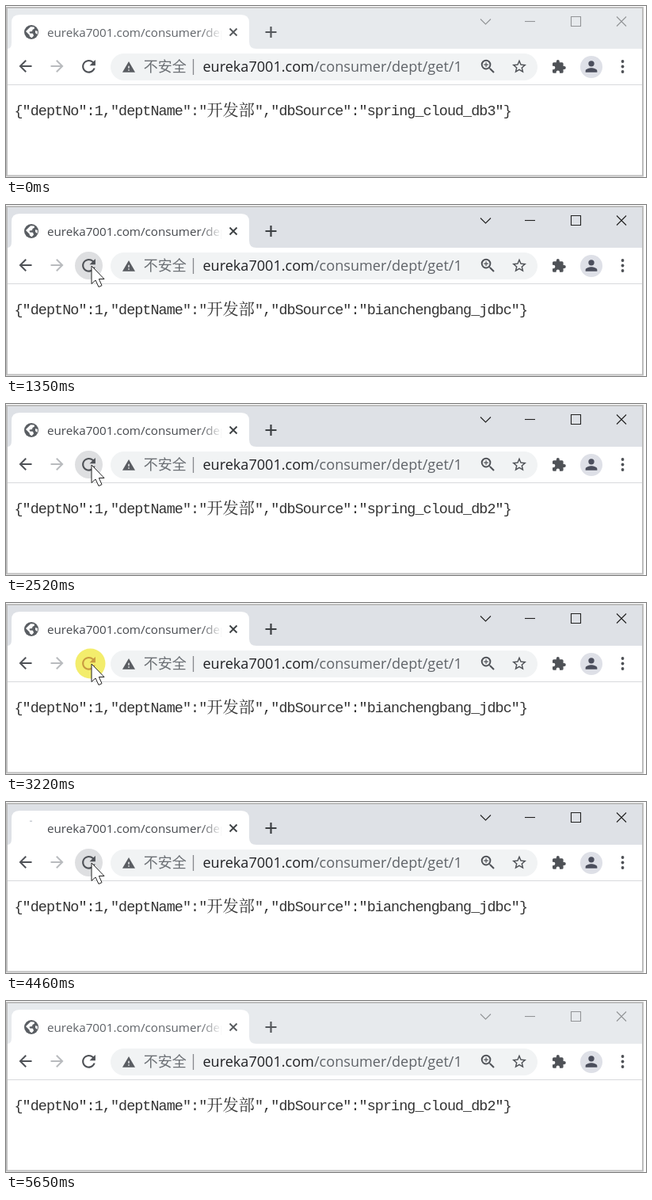
Write an HTML page that moves like this. It is 808 px wide and 216 px high and loops after 5710 ms.

```html
<!DOCTYPE html>
<html lang="zh">
<head>
<meta charset="utf-8">
<title>dept</title>
<style>
  html, body { margin: 0; width: 100%; height: 100%; overflow: hidden; background: #fff; }
  svg { display: block; width: 808px; height: 216px; }
  text { white-space: pre; }
  .ui { font-family: "Open Sans", "Noto Sans", sans-serif; }
  .cjk { font-family: "Noto Sans CJK SC", "Noto Sans CJK", sans-serif; }
  .song { font-family: "Noto Serif CJK SC", "Noto Sans CJK SC", "Noto Sans CJK", serif; }
  .mono { font: 18.4px "Liberation Mono", monospace; letter-spacing: -.92px; }
  .line { fill: none; stroke-width: 1.1; }
</style>
</head>
<body>
<svg viewBox="0 0 808 216">
  <defs>
    <linearGradient id="fade" gradientUnits="userSpaceOnUse" x1="246" y1="0" x2="273" y2="0">
      <stop offset="0" stop-color="#fff"/>
      <stop offset="1" stop-color="#000"/>
    </linearGradient>
    <mask id="clip" maskUnits="userSpaceOnUse" x="40" y="15" width="233" height="36">
      <rect x="40" y="15" width="233" height="36" fill="url(#fade)"/>
    </mask>
  </defs>

  <!-- window -->
  <rect x="1" y="2" width="803" height="212.5" fill="#fff" stroke="#bdbdbd" stroke-width="2"/>
  <rect id="bar" x="2" y="3" width="801" height="51"/>
  <path d="M2 54Q7 54 7 46V21Q7 11 17 11H297Q307 11 307 21V45Q307 54 316 54Z" fill="#fff"/>
  <path d="M2 99.5H803" stroke="#d8dadc"/>

  <!-- tab -->
  <g id="globe">
    <circle cx="32" cy="33" r="9" fill="#5a5e63"/>
    <path d="M31 26.2L35.5 26.6 36 28.5 33.5 30 33 32 29.5 32.5 30 34.5 34 34.8 35 37.5 32.5 40.2 30 38.5 29.5 36.5 25 32Z" fill="#fff"/>
    <path d="M37 31l3 1 -.5 4 -2.5-2z" fill="#fff"/>
  </g>
  <rect id="spin" x="30" y="23.5" width="3" height="1.5" fill="#c9cdd3"/>
  <text id="title" class="ui" x="52" y="39" font-size="15.2" mask="url(#clip)">eureka7001.com/consumer/dept</text>
  <path id="shut" d="M282.5 28.5l9 9m0-9l-9 9" stroke-width="1.8"/>
  <path id="plus" d="M327.5 33h14M334.5 26v14" stroke-width="2.2"/>
  <g id="controls" class="line">
    <path d="M599 16.5l6.5 6.5 6.5-6.5"/>
    <path d="M655 19.5h13"/>
    <path d="M713.5 13.5h12v12h-12z"/>
    <path d="M771 13.5l12 12m0-12l-12 12"/>
  </g>

  <!-- toolbar -->
  <rect x="132" y="60" width="539" height="34" rx="17" fill="#f1f3f4"/>
  <circle id="hover" cx="104.5" cy="76.5" r="17.5"/>
  <circle id="flash" cx="106.5" cy="76.5" r="19" fill="#f3ed6c"/>
  <g id="icons"></g>
  <circle cx="739" cy="77" r="14" fill="#dee0e7"/>
  <g id="person"></g>
  <g fill="#4f5257">
    <circle cx="778.5" cy="70" r="1.9"/>
    <circle cx="778.5" cy="76.5" r="1.9"/>
    <circle cx="778.5" cy="83" r="1.9"/>
  </g>
  <text class="cjk" x="173.8" y="83" font-size="18" fill="#6b6f74">不安全</text>
  <path d="M236.5 67v20" stroke="#85888c" stroke-width="1.3"/>
  <text class="ui" x="248.4" y="83" font-size="18.1" fill="#5f6368"><tspan fill="#202124">eureka7001.com</tspan>/consumer/dept/get/1</text>

  <!-- page -->
  <g fill="#333">
    <text class="mono" x="10.5" y="137.5">{"deptNo":1,"deptName":"</text>
    <text class="song" x="253.4" y="138.5" font-size="20.2">开发部</text>
    <text id="tail" class="mono" x="314.1" y="137.5"></text>
  </g>

  <path id="cursor" d="M0 0V22.5L5 18 9 26.5 13 24.7 9.4 16.5H16Z" fill="#fff" stroke="#222" stroke-linejoin="round"/>
</svg>

<script>
const LOOP = 5710;
const GREY = '#4f5257';
const $ = id => document.getElementById(id);
const set = (id, name, value) => $(id).setAttribute(name, value);
const show = (id, on) => set(id, 'visibility', on ? 'visible' : 'hidden');

// 24-unit icon outlines
const shapes = {
  arrow: 'M20 11H7.83l5.59-5.59L12 4l-8 8 8 8 1.41-1.41L7.83 13H20z',
  reload: 'M17.65 6.35A7.96 7.96 0 0 0 12 4c-4.42 0-8 3.58-8 8s3.58 8 8 8c3.73 0 6.84-2.55 7.73-6h-2.08A6 6 0 1 1 12 6c1.66 0 3.14.69 4.22 1.78L13 11h7V4z',
  star: 'M22 9.24l-7.19-.62L12 2 9.19 8.63 2 9.24l5.46 4.73L5.82 21 12 17.27 18.18 21l-1.63-7.03zM12 15.4l-3.76 2.27 1-4.28-3.32-2.88 4.38-.38L12 6.1l1.71 4.04 4.38.38-3.32 2.88 1 4.28z',
  zoom: 'M15.5 14h-.79l-.28-.27A6.47 6.47 0 0 0 16 9.5 6.5 6.5 0 1 0 9.5 16c1.61 0 3.09-.59 4.23-1.57l.27.28v.79l5 4.99L20.49 19zm-6 0A4.5 4.5 0 1 1 9.5 5a4.5 4.5 0 0 1 0 9zM12.4 10.1h-2.3v2.3H8.9v-2.3H6.6V8.9h2.3V6.6h1.2v2.3h2.3z',
  puzzle: 'M20.5 11H19V7a2 2 0 0 0-2-2h-4V3.5a2.5 2.5 0 0 0-5 0V5H4a2 2 0 0 0-2 2v3.8h1.5a2.7 2.7 0 0 1 0 5.4H2V20a2 2 0 0 0 2 2h3.8v-1.5a2.7 2.7 0 0 1 5.4 0V22H17a2 2 0 0 0 2-2v-4h1.5a2.5 2.5 0 0 0 0-5z',
  warning: 'M1 21h22L12 2zm12-3h-2v-2h2zm0-4h-2v-4h2z',
  person: 'M12 12a4 4 0 1 0 0-8 4 4 0 0 0 0 8zm0 2c-2.67 0-8 1.34-8 4v2h16v-2c0-2.66-5.33-4-8-4z'
};

const icon = (name, x, y, scale, fill = GREY, flip = 1) =>
  `<path id="${name}Icon${flip}" d="${shapes[name]}" fill="${fill}" fill-rule="evenodd"
    transform="translate(${x} ${y}) scale(${scale * flip} ${scale}) translate(-12 -12)"/>`;

$('person').innerHTML = icon('person', 739, 76.5, .92, '#4b4e5c');
$('icons').innerHTML =
  icon('arrow', 24.5, 76, 1) +
  icon('arrow', 64.5, 76, 1, '#b9bbbe', -1) +
  icon('reload', 104.5, 76.3, 1.05) +
  icon('warning', 155, 77.3, .73, '#5a5d62') +
  icon('zoom', 608.5, 76.5, .97) +
  icon('star', 648, 76.5, .9) +
  icon('puzzle', 698, 76.8, .8);

// screen updates come in bursts: first time, last time, count
const bursts = [
  [310, 870, 8], [950, 1500, 8], [1580, 2120, 8], [2210, 2750, 8], [2820, 3370, 8],
  [3450, 4000, 8], [4080, 4630, 8], [4700, 5260, 8], [5310, 5410, 2], [5580, 5650, 2]
];
const ticks = [0, ...bursts.flatMap(([a, b, n]) =>
  Array.from({ length: n }, (_, i) => Math.floor((a + (b - a) * i / (n - 1)) / 10) * 10))];

// each click flashes, then loads, then brings the next database
const clicks = [950, 1960, 2580, 2890, 3210, 3600, 4000, 4300, 4700, 5010, 5250];
const FLASH = 70, LOAD = 200;
const sources = ['spring_cloud_db3', 'bianchengbang_jdbc', 'spring_cloud_db2'];

const enter = { from: 310, to: 790, x0: 330, y0: 126, x1: 108, y1: 77 };

function draw(ms) {
  const t = ticks.filter(k => k <= ms).pop();
  const active = t >= 950 && t < 5650;
  const last = clicks.filter(c => c <= t).pop();
  const age = last === undefined ? Infinity : t - last;
  const flash = age < FLASH;
  const loading = age >= FLASH && age < LOAD;
  const loads = clicks.filter(c => t - c >= LOAD).length;
  const onPage = t >= enter.from && t < 5650;

  const p = Math.min(1, Math.max(0, (t - enter.from) / (enter.to - enter.from)));
  const e = 1 - (1 - p) ** 2;
  const x = enter.x0 + (enter.x1 - enter.x0) * e;
  const y = enter.y0 + (enter.y1 - enter.y0) * e;
  const over = onPage && Math.hypot(x - 104.5, y - 76.5) < 18;

  set('bar', 'fill', active ? '#dee1e6' : '#e7eaed');
  set('controls', 'stroke', active ? '#222' : '#929497');
  set('title', 'fill', active ? '#45484d' : '#5f6368');
  set('shut', 'stroke', active ? '#3c4043' : '#55585c');
  set('plus', 'stroke', active ? '#3c4043' : '#55585c');

  show('globe', !loading);
  show('spin', loading);
  show('hover', over && !flash);
  set('hover', 'fill', active ? '#dedfe1' : '#f3f3f4');
  show('flash', flash);
  set('reloadIcon1', 'fill', flash ? '#c99a40' : GREY);

  const tail = `","dbSource":"${sources[loads % sources.length]}"}`;
  if ($('tail').textContent !== tail) $('tail').textContent = tail;

  show('cursor', onPage);
  set('cursor', 'transform', `translate(${x.toFixed(1)} ${y.toFixed(1)})`);
}

const start = performance.now();
function loop() {
  draw((performance.now() - start) % LOOP);
  requestAnimationFrame(loop);
}
loop();
</script>
</body>
</html>
```
